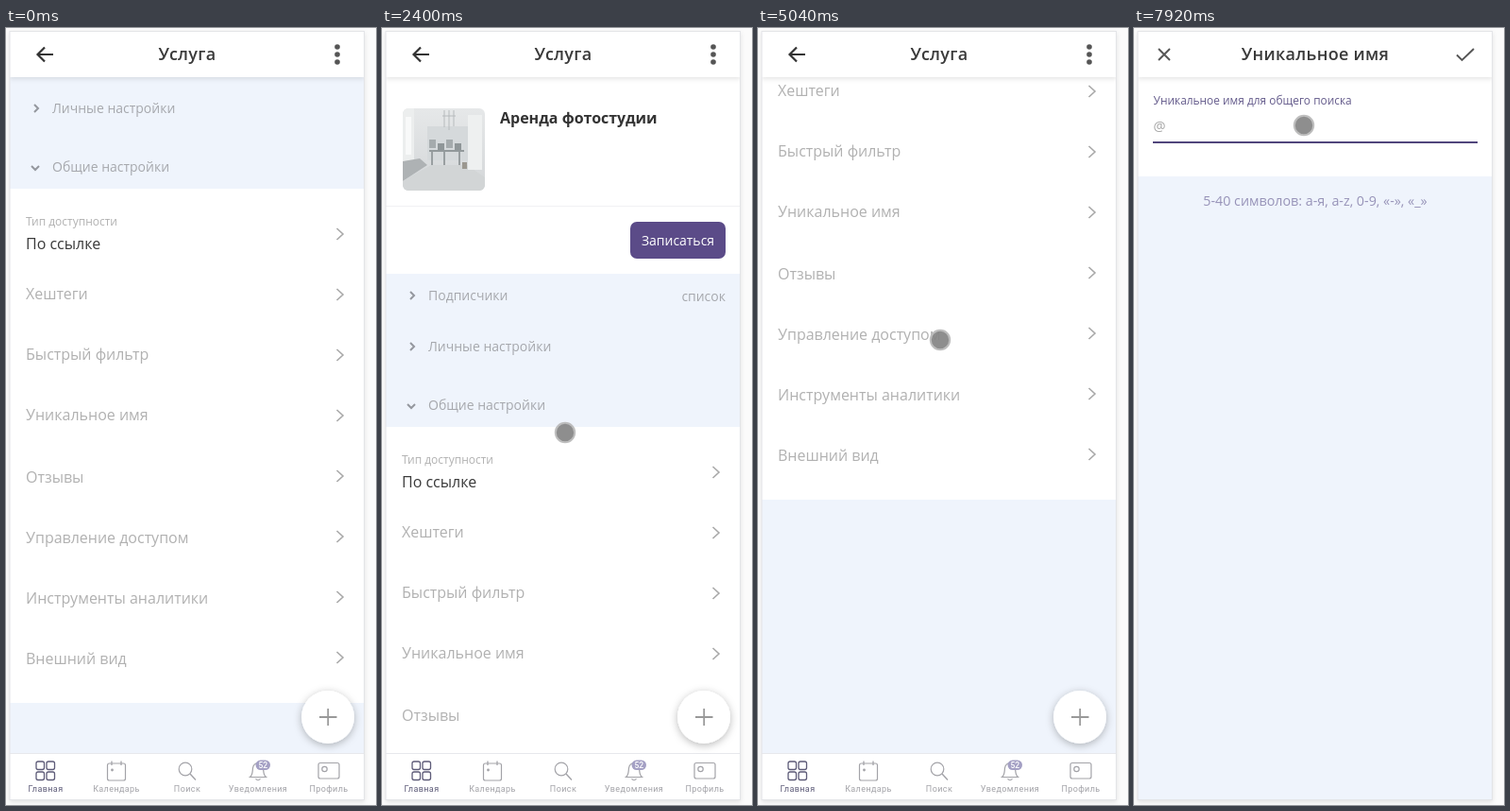
Animation of 392 by 822 pixels, one loop 8 s. Source, as an HTML page:

```html
<!DOCTYPE html>
<html lang="ru">
<head>
<meta charset="utf-8">
<style>
html, body { margin: 0; width: 100%; height: 100%; overflow: hidden; background: #fbfbfb; }
svg { display: block; width: 392px; height: 822px; font-family: "Open Sans", "Noto Sans", sans-serif; }
.nav text { font-family: Roboto, Arial, sans-serif; }
</style>
</head>
<body>
<svg id="stage" viewBox="0 0 392 822" xmlns="http://www.w3.org/2000/svg"></svg>
<script>
const LOOP = 8000, STEP = 120;
const BLUE = '#eff4fc', GREY = '#b1b1b1', DARK = '#3a3a3a', MUTED = '#a6a8ad', VIOLET = '#5b4b88';

// Shape helpers; text is placed by the middle of its capitals.
const text = (s, x, y, size, fill, more = '') =>
  `<text x="${x}" y="${y + size * 0.35}" font-size="${size}" fill="${fill}" ${more}>${s}</text>`;
const rect = (x, y, w, h, fill, more = '') =>
  `<rect x="${x}" y="${y}" width="${w}" height="${h}" fill="${fill}" ${more}/>`;
const line = (d, color, width = 1, more = '') =>
  `<path d="${d}" fill="none" stroke="${color}" stroke-width="${width}" ${more}/>`;
const circle = (x, y, r, fill, more = '') =>
  `<circle cx="${x}" cy="${y}" r="${r}" fill="${fill}" ${more}/>`;
const chevron = y => line(`M350.5 ${y - 6}l6.5 6l-6.5 6`, '#a9a9a9', 1.6);
const middle = 'text-anchor="middle"';

const header = (title, icons) =>
  rect(4, 3, 376, 49, '#fff', 'filter="url(#drop)"') +
  text(title, 192, 28, 18, DARK, middle + ' font-weight="600" letter-spacing=".3"') + icons;

const backIcons =
  line('M50 28H34M41 20.5L33.5 28L41 35.5', '#333', 2.2) +
  [20, 28, 36].map(y => circle(351, y, 2.8, '#555')).join('');
const formIcons =
  line('M26 22L38 34M38 22L26 34', '#555', 1.9) +
  line('M342 28.5L347.5 34L360 22', '#555', 1.9);

function photo() {
  const box = (x, y, w, h, c) => rect(x, y, w, h, c);
  return '<g clip-path="url(#photoClip)">' +
    rect(22, 85, 87, 87, 'url(#wall)') +
    box(22, 85, 12, 60, '#eceeee') + box(25, 94, 6, 40, '#f8f9f9') +
    box(48, 104, 44, 36, '#d5d9db') +
    line('M66 87V105M71 87V108M76 87V104M64 93H78', '#b7bbbd', 1) +
    [50, 59, 68, 77].map((x, i) => box(x, 118 + i % 2 * 4, 7, 9, i % 2 ? '#8f9698' : '#a5abad')).join('') +
    box(50, 129, 37, 2, '#92999b') +
    line('M53 131V145M66 131V147M82 131V145', '#999fa1', 2) +
    '<path d="M22 141L40 138L48 145L22 162Z" fill="#aeb2b4"/>' +
    '<path d="M22 162L52 145H90L109 158V172H22Z" fill="#d2d5d6"/>' +
    box(91, 92, 15, 58, '#eef0f0') + box(85, 142, 5, 7, '#9c9890') +
    '</g>';
}

function section(name, y, open) {
  const d = open ? `M27 ${y - 1}l4 4l4-4` : `M30 ${y - 4}l4 4l-4 4`;
  return line(d, '#94979e', 2) + text(name, 49, y, 14, MUTED);
}

function service() {
  const rows = ['Хештеги', 'Быстрый фильтр', 'Уникальное имя', 'Отзывы',
    'Управление доступом', 'Инструменты аналитики', 'Внешний вид'];
  return rect(4, 3, 376, 257, '#fff') + photo() +
    text('Аренда фотостудии', 125, 95, 16, '#333', 'font-weight="700"') +
    line('M4 188.5H380', '#f1f1f3') +
    rect(263, 205, 101, 39, VIOLET, 'rx="7"') +
    text('Записаться', 313.5, 225, 14, '#fff', middle) +
    section('Подписчики', 283) + text('список', 364, 284, 14, MUTED, 'text-anchor="end"') +
    section('Личные настройки', 337) + section('Общие настройки', 399, true) +
    rect(4, 422, 376, 544, '#fff') +
    text('Тип доступности', 21, 457, 12, GREY) +
    text('По ссылке', 21, 480, 16, DARK) + chevron(470) +
    rows.map((s, i) => text(s, 21, 533 + i * 64 + (i > 2 ? 2 : 0), 16, GREY) + chevron(534 + i * 64)).join('');
}

function navBar() {
  const c = '#a3a3a8', on = '#5d5b78';
  const names = ['Главная', 'Календарь', 'Поиск', 'Уведомления', 'Профиль'];
  const grid = [[32, 776], [43, 776], [32, 787], [43, 787]].map(([x, y]) =>
    rect(x, y, 8.5, 8.5, 'none', `rx="2" stroke="${on}" stroke-width="1.3"`)).join('');
  const outline = `stroke="${c}" stroke-width="1.2"`;
  return '<g class="nav">' + rect(4, 768, 376, 49, '#fff') + line('M4 767.5H380', '#e7e8ec') + grid +
    rect(107.5, 778, 19, 18, 'none', 'rx="2" ' + outline) + line('M112 775.5V780M122 775.5V780', c, 1.3) +
    circle(112.5, 785, 1.4, c) +
    circle(190, 784, 6.8, 'none', outline) + line('M195 789L201 795.5', c, 1.4) +
    line('M258.5 792.5H275.5C272.5 790 273 787 272.5 783C271.5 776 262.5 776 261.5 783C261 787 261.5 790 258.5 792.5ZM264.5 794Q267 797.5 269.5 794', c, 1.2) +
    rect(264.5, 774.5, 15.5, 10.5, '#a4a0c4', 'rx="5.2"') +
    text('52', 272.3, 779.8, 8.5, '#fff', middle + ' font-weight="500"') +
    rect(331, 777.5, 22, 16.5, 'none', 'rx="2" ' + outline) + circle(337.5, 784, 2.7, 'none', outline) +
    names.map((s, i) => text(s, 42 + i * 75, 804.8, 9, i ? c : on, middle + ' letter-spacing=".4"')).join('') +
    '</g>' +
    circle(341, 729, 28, '#fff', 'filter="url(#lift)"') + line('M332 729H350.5M341.2 720V738', '#999', 1.8);
}

const formPage = (title, whiteEnd, body) =>
  rect(4, 3, 376, 814, BLUE) + rect(4, 52, 376, whiteEnd - 52, '#fff') + header(title, formIcons) + body;

const lookPage = formPage('Внешний вид', 222,
  text('Обложка элемента', 20.5, 75, 11, GREY) + text('Изображение', 20.5, 99.5, 15, DARK) +
  '<path d="M349 97H360L354.5 102.5Z" fill="#666"/>' + line('M21 116.5H364', '#e6e6e6') +
  text('Отображение секций', 21, 167, 14.8, GREY) +
  '<path d="M354 163L358.5 167L354 171Z" fill="#999"/>' + line('M21 185.5H364', '#e6e6e6'));

const namePage = formPage('Уникальное имя', 157,
  text('Уникальное имя для общего поиска', 20.5, 77, 11.9, '#655c8c') +
  text('@', 20.5, 103.5, 14.5, '#a5a5a5') + line('M21 120.5H364', '#e6e6e6') +
  '<path id="focus" fill="none" stroke="#51467c" stroke-width="2"/>' +
  text('5-40 символов: а-я, a-z, 0-9, «-», «_»', 192, 183, 14.3, '#9793b8', middle));

const stage = document.getElementById('stage');
stage.innerHTML = `<defs>
  <clipPath id="phone"><rect x="4" y="3" width="376" height="814"/></clipPath>
  <clipPath id="photoClip"><rect x="22" y="85" width="87" height="87" rx="6"/></clipPath>
  <linearGradient id="wall" x2="0" y2="1"><stop stop-color="#e6e8e9"/><stop offset="1" stop-color="#d3d6d8"/></linearGradient>
  <filter id="drop" x="-10%" y="-20%" width="120%" height="160%"><feDropShadow dx="0" dy="2" stdDeviation="2.5" flood-opacity=".1"/></filter>
  <filter id="lift" x="-40%" y="-40%" width="180%" height="180%"><feDropShadow dx="0" dy="2" stdDeviation="4" flood-opacity=".28"/></filter>
  </defs>` +
  rect(0, 0, 392, 822, '#fbfbfb') + rect(4, 3, 376, 814, BLUE, 'filter="url(#drop)"') +
  '<g clip-path="url(#phone)"><g id="list">' + service() + '</g>' +
  header('Услуга', backIcons) + navBar() +
  `<g id="look">${lookPage}</g><g id="name">${namePage}</g></g>` +
  rect(4, 3.5, 375.5, 813, 'none', 'stroke="#e3e4e7"') +
  circle(0, 0, 10.2, '#858585', 'id="pointer" stroke="#b9b9b9" stroke-width="2" opacity=".92"');

const [list, look, name, focus, pointer] =
  ['list', 'look', 'name', 'focus', 'pointer'].map(id => document.getElementById(id));

// Eased value(s) at time t from rows of [time, ...values].
function track(keys, t) {
  const i = keys.findIndex(k => k[0] > t);
  if (i === 0) return keys[0].slice(1);
  if (i < 0) return keys[keys.length - 1].slice(1);
  const a = keys[i - 1], b = keys[i];
  const p = (t - a[0]) / (b[0] - a[0]), e = p * p * (3 - 2 * p);
  return a.slice(1).map((v, j) => v + (b[j + 1] - v) * e);
}

const scrollKeys = [[120, 252], [780, 0], [2460, 0], [2940, 467], [5060, 467], [5700, 50]];
const pointerKeys = [
  [120, 106, 223], [720, 106, 475], [1800, 106, 475], [2280, 194, 428], [2460, 194, 428],
  [2820, 194, 120], [3060, 188, 452], [3180, 188, 452], [3480, 183, 208], [3660, 183, 208],
  [4140, 32, 32], [4440, 32, 32], [4920, 193, 330], [5060, 193, 330], [5580, 193, 690],
  [5940, 106, 611], [6380, 106, 611], [6720, 180, 170], [7000, 180, 103]];
const lookKeys = [[3080, 0], [3340, 1], [4280, 1], [4540, 0]];
const nameKeys = [[6040, 0], [6300, 1]];
const focusKeys = [[7080, 0], [7340, 1]];

function showPage(page, amount) {
  page.setAttribute('opacity', amount);
  page.setAttribute('transform', `translate(0 ${40 * (1 - amount)})`);
}

function draw(t) {
  list.setAttribute('transform', `translate(0 ${-track(scrollKeys, t)[0]})`);
  showPage(look, track(lookKeys, t)[0]);
  showPage(name, track(nameKeys, t)[0]);
  const half = 172 * track(focusKeys, t)[0];
  focus.setAttribute('d', half ? `M${192 - half} 121H${192 + half}` : '');
  const [x, y] = track(pointerKeys, t);
  pointer.setAttribute('transform', `translate(${x} ${y})`);
  pointer.setAttribute('visibility', t < 120 ? 'hidden' : 'visible');
}

const start = performance.now();
function tick() {
  const t = (performance.now() - start) % LOOP;
  draw(Math.floor(t / STEP) * STEP);
  requestAnimationFrame(tick);
}
tick();
</script>
</body>
</html>
```
